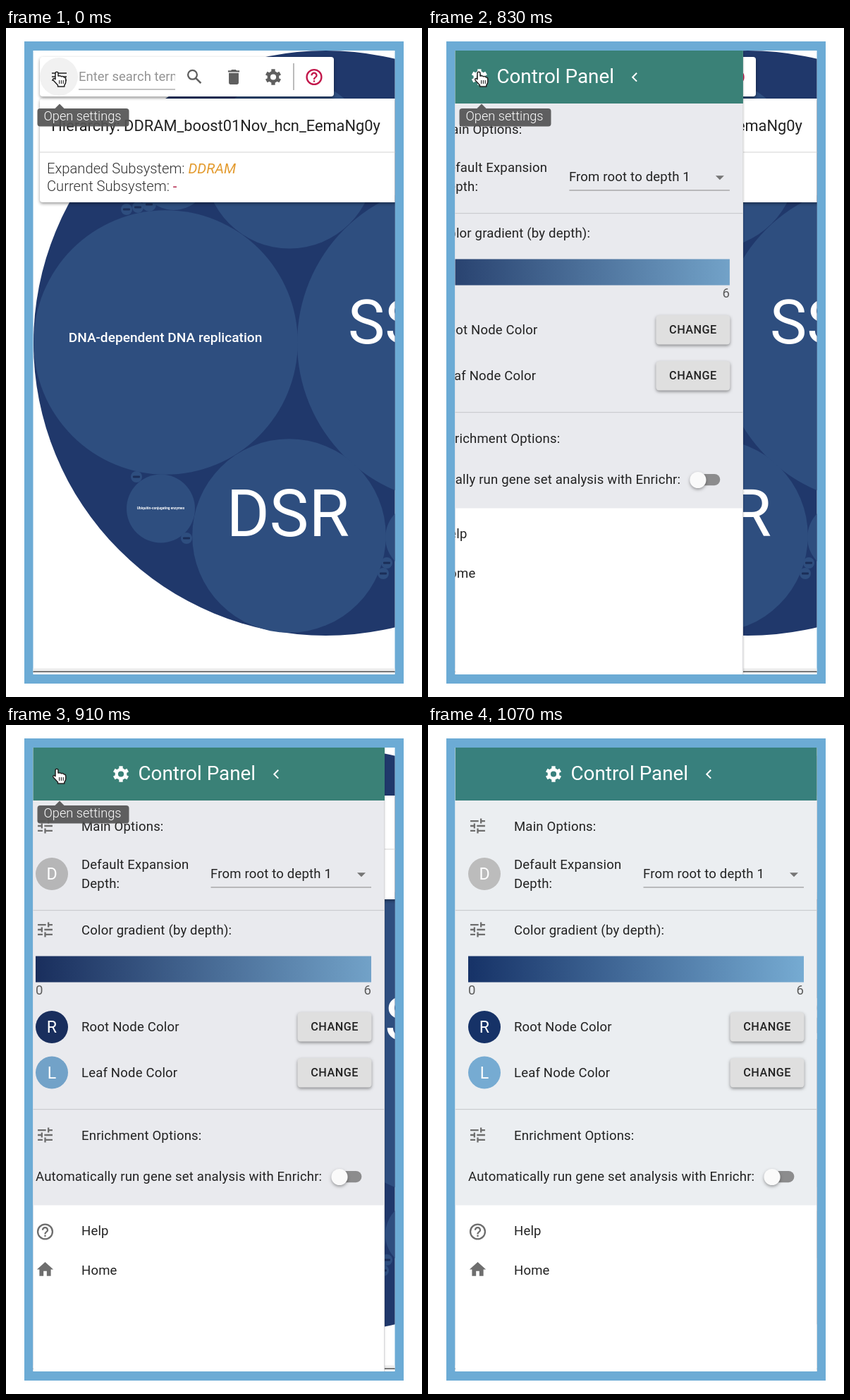
Write an HTML page with a canvas that moves like this. It is 590 px wide and 948 px high and loops after 1.11 s.

```html
<!DOCTYPE html>
<html lang="en">
<head>
<meta charset="utf-8">
<title>Control panel drawer</title>
<style>
html, body { margin: 0; width: 100%; height: 100%; overflow: hidden; background: #fff; }
canvas { display: block; }
</style>
</head>
<body>
<canvas id="stage" width="590" height="948"></canvas>
<script>
const ctx = document.getElementById('stage').getContext('2d');
const LOOP = 1110, OPEN = 750, STEP = 40, CLEAN = 1070;
const U = 1.16; // interface scale
const BODY = 16 * U;

const ICONS = {
  trash: 'M6 19c0 1.1.9 2 2 2h8c1.1 0 2-.9 2-2V7H6v12zM19 4h-3.5l-1-1h-5l-1 1H5v2h14V4z',
  tune: 'M3 17v2h6v-2H3zM3 5v2h10V5H3zm10 16v-2h8v-2h-8v-2h-2v6h2zM7 9v2H3v2h4v2h2V9H7zm14 4v-2H11v2h10zm-6-4h2V7h4V5h-4V3h-2v6z',
  home: 'M10 20v-6h4v6h5v-8h3L12 3 2 12h3v8z',
  query: 'M11 18h2v-2h-2v2zm1-12c-2.21 0-4 1.79-4 4h2c0-1.1.9-2 2-2s2 .9 2 2c0 2-3 1.75-3 5h2c0-2.25 3-2.5 3-5 0-2.21-1.79-4-4-4z'
};
for (const k in ICONS) ICONS[k] = new Path2D(ICONS[k]);
const HAND = new Path2D('M70 64.2q0-2 2-2q2 0 2 2V68q3.5-1 4.6 .8q2.6-.8 3.6 1q2.6 0 2.6 3V76q0 3-2 5V83H73.5V81L67 74q-1-2 1-2.6L70 72.6Z');

function rect(x, y, w, h, color) {
  ctx.fillStyle = color;
  ctx.fillRect(x, y, w, h);
}

function round(x, y, w, h, r, color) {
  ctx.fillStyle = color;
  ctx.beginPath();
  ctx.roundRect(x, y, w, h, r);
  ctx.fill();
}

function disc(x, y, r, color) {
  ctx.fillStyle = color;
  ctx.beginPath();
  ctx.arc(x, y, r, 0, Math.PI * 2);
  ctx.fill();
}

function line(points, color, width) {
  ctx.strokeStyle = color;
  ctx.lineWidth = width;
  ctx.beginPath();
  points.forEach(([x, y]) => ctx.lineTo(x, y));
  ctx.stroke();
}

function ring(x, y, r, color, width) {
  ctx.strokeStyle = color;
  ctx.lineWidth = width;
  ctx.beginPath();
  ctx.arc(x, y, r, 0, Math.PI * 2);
  ctx.stroke();
}

function text(str, x, y, size, color, { style = '400', align = 'left', gap = 0 } = {}) {
  ctx.font = `${style} ${size}px Roboto, sans-serif`;
  ctx.letterSpacing = gap * size + 'px';
  ctx.textAlign = align;
  ctx.fillStyle = color;
  ctx.fillText(str, x, y);
  return ctx.measureText(str).width;
}

function shadow(blur, dy, alpha, draw) {
  ctx.save();
  ctx.shadowColor = `rgba(0,0,0,${alpha})`;
  ctx.shadowBlur = blur;
  ctx.shadowOffsetY = dy;
  draw();
  ctx.restore();
}

function icon(name, x, y, color) {
  ctx.save();
  ctx.translate(x, y);
  ctx.scale(U, U);
  ctx.translate(-12, -12);
  ctx.fillStyle = color;
  ctx.fill(ICONS[name]);
  ctx.restore();
}

function help(x, y, color) {
  ring(x, y, 9 * U, color, 2 * U);
  icon('query', x, y, color);
}

function gear(x, y, color) {
  const polar = (r, a) => [x + r * Math.cos(a), y + r * Math.sin(a)];
  ctx.fillStyle = color;
  ctx.beginPath();
  ctx.arc(x, y, 8.4, 0, Math.PI * 2);
  ctx.closePath();
  for (let i = 0; i < 6; i++) {
    const a = Math.PI / 2 + i * Math.PI / 3;
    ctx.moveTo(...polar(6.8, a - .42));
    ctx.lineTo(...polar(11.5, a - .23));
    ctx.lineTo(...polar(11.5, a + .23));
    ctx.lineTo(...polar(6.8, a + .42));
    ctx.closePath();
  }
  ctx.moveTo(x + 4.1, y);
  ctx.arc(x, y, 4.1, 0, Math.PI * 2, true);
  ctx.fill();
}

function tiny(x, y, r = 8) {
  disc(x, y, r, '#2e4e7f');
  round(x - 5, y - 1.5, 10, 3, 1, '#1b2e58');
}

function bubbles() {
  const fill = '#2e4e7f';
  disc(453.5, 446.5, 414.5, '#20386b');
  disc(226.5, 445.5, 187.3, fill);
  disc(640, 446, 227, fill);
  disc(402, 192, 120.6, fill);
  disc(401.5, 719.5, 137.3, fill);
  disc(219.5, 681, 48.5, fill);
  disc(238, 210, 48, fill);
  disc(586, 722, 48, fill);
  tiny(171, 257);
  tiny(187, 254);
  tiny(203, 250, 10);
  tiny(185, 636);
  tiny(256, 723);
  tiny(540, 758);
  tiny(535, 773);
  text('DNA-dependent DNA replication', 226, 445, 19.1, '#fff', { style: '500', align: 'center' });
  text('Ubiquitin-conjugating enzymes', 219.5, 681.5, 4.8, '#fff', { style: '700', align: 'center' });
  text('SS', 485, 446.5, 88, '#fff');
  text('DSR', 312.5, 720, 93.5, '#fff');
}

function infoCard() {
  shadow(4, 2, .4, () => round(48, 100, 520, 147, 4, '#fff'));
  rect(48, 175.5, 520, 1, '#d4d4d4');
  text('Hierarchy: DDRAM_boost01Nov_hcn_EemaNg0y', 64.3, 146, 21.8, '#222');
  const light = { style: '300' };
  let w = text('Expanded Subsystem: ', 58, 206, 20.2, '#333', light);
  text('DDRAM', 58 + w, 206, 20.2, '#e39a2d', { style: 'italic 400' });
  w = text('Current Subsystem: ', 58, 231, 20.2, '#333', light);
  text('-', 58 + w, 231, 20.2, '#b3284d');
}

function toolbar() {
  const gray = '#5f5f5f';
  shadow(4, 2, .4, () => round(48, 41, 417, 56, 4, '#fff'));
  disc(75, 69, 27, '#f1f1f1');
  for (const y of [64, 69, 74]) line([[65, y], [86, y]], '#555', 2);
  ctx.save();
  ctx.beginPath();
  ctx.rect(103, 50, 137, 36);
  ctx.clip();
  text('Enter search term', 103, 75, 18.5, '#949494');
  ctx.restore();
  rect(103, 86.5, 137, 1, '#888');
  ring(264.5, 66.3, 6.4, gray, 2.3);
  line([[269, 70.8], [276.4, 78.2]], gray, 2.6);
  icon('trash', 323, 69.5, gray);
  gear(379, 69.5, gray);
  rect(407.3, 50, 1.3, 38, '#999');
  help(437, 69.5, '#c2184b');
}

function avatar(letter, y, color) {
  disc(80, y, 23, color);
  text(letter, 80, y + 8, 20 * U, '#fff', { align: 'center' });
}

function button(y) {
  shadow(4, 2, .4, () => round(428.5, y, 105, 41.5, 4.5, '#dfdfdf'));
  text('CHANGE', 481, y + 26, 14 * U, '#222', { style: '500', align: 'center', gap: .02857 });
}

function drawer(dx, clean) {
  const pick = (a, b) => clean ? b : a;
  const ink = '#222', gray = '#6e6e6e';
  const root = pick('#192e5d', '#163267'), leaf = pick('#72a2c8', '#76abd2');
  const label = (str, y, x = 122) => text(str, x, y, BODY, ink, { gap: .00938 });

  ctx.save();
  ctx.translate(dx, 0);
  shadow(3, 0, .25, () => rect(38.5, 32, 513.5, 886, '#fff'));
  rect(551, 32, 1, 886, '#d8d8da');
  rect(38.5, 107, 512.5, 573.5, pick('#e9eaee', '#ebeef1'));
  rect(38.5, 32, 513.5, 75, pick('#3a8177', '#38807d'));

  gear(178, 69.5, '#fff');
  text('Control Panel', 202.5, 78, 24 * U, '#fff');
  line([[401.2, 63.8], [395.3, 69.7], [401.2, 75.6]], '#fff', 2);

  for (const y of [143, 290, 581]) icon('tune', 70.5, y, gray);
  for (const y of [262, 544]) rect(38.5, y, 513, 1.2, '#cacccf');

  label('Main Options:', 150);
  avatar('D', 211, pick('#b6b6b7', '#bcbcbc'));
  label('Default Expansion', 204);
  label('Depth:', 231);
  label('From root to depth 1', 217, 305);
  rect(305.5, 229.5, 227.5, 1, '#888');
  ctx.fillStyle = '#757575';
  ctx.beginPath();
  ctx.moveTo(513, 209.3);
  ctx.lineTo(525, 209.3);
  ctx.lineTo(519, 215.3);
  ctx.fill();

  label('Color gradient (by depth):', 297);
  const grad = ctx.createLinearGradient(57, 0, 533, 0);
  grad.addColorStop(0, root);
  grad.addColorStop(1, leaf);
  rect(57, 327.5, 476, 37, grad);
  text('0', 57, 382, BODY, '#5c5c5c');
  text('6', 533, 382, BODY, '#5c5c5c', { align: 'right' });

  avatar('R', 428, root);
  label('Root Node Color', 433.5);
  button(407);
  avatar('L', 492.5, leaf);
  label('Leaf Node Color', 499);
  button(472);

  label('Enrichment Options:', 588);
  label('Automatically run gene set analysis with Enrichr:', 646, 57);
  round(480, 632, 39.4, 16.2, 8.1, '#8c8c8d');
  shadow(4, 2, .35, () => disc(488, 640.5, 11.6, '#fafafa'));

  help(70.5, 718, gray);
  label('Help', 723);
  icon('home', 70.5, 771.5, gray);
  label('Home', 778.5);
  ctx.restore();
}

function tooltip() {
  const color = 'rgba(84,84,84,.93)';
  ctx.fillStyle = color;
  ctx.beginPath();
  ctx.moveTo(69.5, 114);
  ctx.lineTo(76, 107.5);
  ctx.lineTo(82.5, 114);
  ctx.fill();
  round(44.5, 114, 130, 25.5, 4, color);
  text('Open settings', 53.5, 131, 18.2, '#fff', { style: '300' });
}

function pointer() {
  ctx.lineJoin = 'round';
  ctx.strokeStyle = '#222';
  ctx.lineWidth = 1.5;
  ctx.fillStyle = '#fff';
  ctx.fill(HAND);
  ctx.stroke(HAND);
  for (const x of [75.6, 78.4, 81.2]) line([[x, 74], [x, 79]], '#222', 1.1);
  ctx.lineJoin = 'miter';
}

// cubic-bezier(0, 0, .2, 1)
function easeOut(x) {
  let lo = 0, hi = 1;
  for (let i = 0; i < 30; i++) {
    const s = (lo + hi) / 2;
    if (.6 * s * s + .4 * s ** 3 < x) lo = s; else hi = s;
  }
  return 3 * lo * lo - 2 * lo ** 3;
}

function slide(t) {
  const n = Math.floor((t - OPEN) / STEP);
  const x = .147 + .1485 * n + Math.max(0, n - 3) * .032;
  return -513 * (1 - easeOut(Math.min(1, x)));
}

function draw(t) {
  const clean = t >= CLEAN;
  rect(0, 0, 590, 948, '#fff');
  rect(26, 19, 538, 910, '#6cabd5');
  ctx.save();
  ctx.beginPath();
  ctx.rect(38.5, 32, 513, 884);
  ctx.clip();
  rect(38, 32, 514, 884, '#fff');
  bubbles();
  infoCard();
  toolbar();
  rect(38, 907.5, 514, 4, '#ececec');
  rect(38, 911.5, 514, 1.3, '#333');
  if (t >= OPEN) drawer(slide(t), clean);
  if (!clean) {
    tooltip();
    pointer();
  }
  ctx.restore();
}

const start = performance.now();
function tick() {
  draw((performance.now() - start) % LOOP);
  requestAnimationFrame(tick);
}
tick();
</script>
</body>
</html>
```
